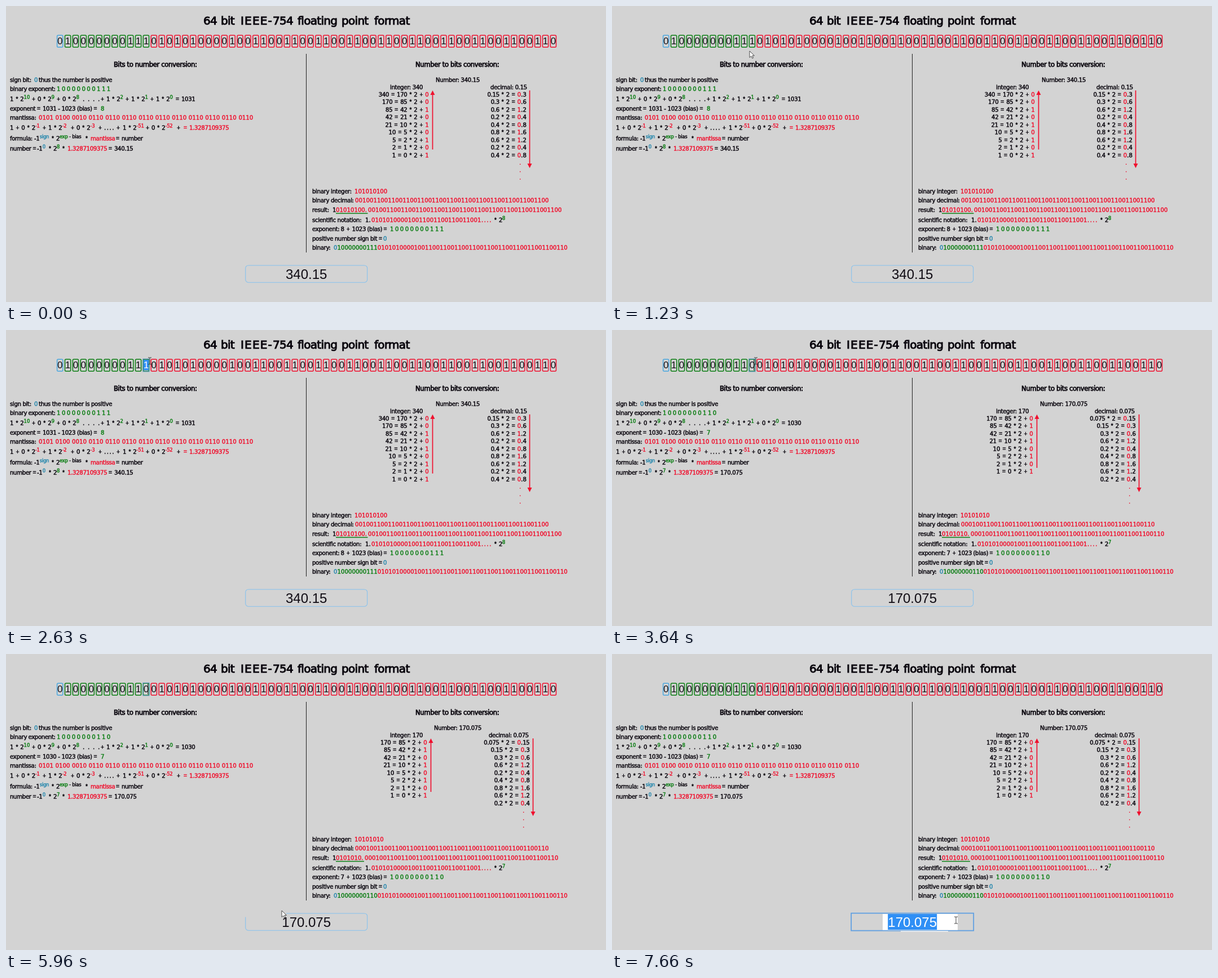
An HTML page for the animation above (8 s loop, 1064 by 526 pixels).

```html
<!DOCTYPE html>
<html lang="en">
<head>
<meta charset="utf-8">
<title>64 bit IEEE-754 floating point format</title>
<style>
html, body { margin: 0; width: 100%; height: 100%; overflow: hidden; background: #d3d3d3; }
svg { display: block; width: 100vw; height: 100vh; }
text { white-space: pre; }
.note { font-family: "DejaVu Sans", sans-serif; }
.note tspan { fill: currentColor; stroke: currentColor; }
.note .op { font-family: "Liberation Sans", Arial, sans-serif; word-spacing: 0.11em; }
.field { font-family: "Liberation Sans", Arial, sans-serif; fill: #100c14; }
</style>
</head>
<body>
<svg id="stage" viewBox="0 0 1064 526"></svg>
<script>
const LOOP = 8000;
const FLIP = 3640, BIT_FOCUS = 2080, FIELD_FOCUS = 7120;
const INK = { k: '#08040c', r: '#f0102e', g: '#0a7d12', b: '#2788ad' };
const EDITED = 11;

function el(parent, tag, attrs = {}, content) {
  const node = document.createElementNS('http://www.w3.org/2000/svg', tag);
  for (const key in attrs) node.setAttribute(key, attrs[key]);
  if (content !== undefined) node.textContent = content;
  parent.appendChild(node);
  return node;
}

// Letter spacing in em by kind of run.
function spacingOf(run) {
  if (/[=+*]/.test(run)) return 0;
  if (/^\.{2,}$/.test(run)) return 0.15;
  if (/^[01.]+$/.test(run)) return 0;
  if (/^[A-Z]+-$/.test(run)) return 0.06;
  return -0.035;
}

// Markup: ~c picks an ink, ^ and _ open and close a superscript, @x; jumps to x.
function note(parent, x, y, src, { size = 10.2, weight = 0.45, anchor = 'start', gap } = {}) {
  const line = el(parent, 'text', {
    class: 'note', x, y, 'font-size': size, 'stroke-width': weight, 'text-anchor': anchor
  });
  if (gap) line.setAttribute('word-spacing', gap);
  let ink = 'k', sup = false, raised = 0, jump = null;
  for (const part of src.match(/~[kgrb]|\^|_|@\d+;| ?[=+*] ?|\d[\d.]*|\.+|[^~^_@\d.=+*]+/g)) {
    if (part[0] === '~') ink = part[1];
    else if (part === '^') sup = true;
    else if (part === '_') sup = false;
    else if (part[0] === '@') jump = parseInt(part.slice(1), 10);
    else {
      const span = el(line, 'tspan', { style: `color:${INK[ink]};letter-spacing:${spacingOf(part)}em` }, part);
      const lift = sup ? -4 : 0;
      if (/[=+*]/.test(part)) span.setAttribute('class', 'op');
      if (sup) span.setAttribute('font-size', 8.5);
      if (lift !== raised) span.setAttribute('dy', lift - raised);
      if (jump !== null) span.setAttribute('x', jump);
      raised = lift;
      jump = null;
    }
  }
}

function arrow(parent, x, from, to) {
  const d = Math.sign(to - from);
  el(parent, 'path', { d: `M${x} ${from}V${to - d * 6}`, stroke: INK.r, 'stroke-width': 1.7 });
  el(parent, 'path', { d: `M${x} ${to}l-4 ${-d * 8}h8z`, fill: INK.r });
}

const mantissa = '010101000010' + '0110'.repeat(10);
const spaced = s => s.split('').join(' ');
const round = v => +v.toFixed(3);

function leftSide(g, value, power, exponent) {
  const e = exponent;
  note(g, 7, 134.5, 'sign bit: @50;~b0@58;~kthus the number is positive');
  note(g, 7, 150.5, `binary exponent: @90;~g${spaced(e)}`, { gap: -0.5 });
  const term = (bit, p) => `${bit} * 2~g^${p}_~k`;
  note(g, 7, 168.5, `${term(e[0], 10)}@46;+ ${term(e[1], 9)}@90;+ ${term(e[2], 8)}@136;.  .  .  .` +
    `@168;+ ${term(e[8], 2)}@212;+ ${term(e[9], 1)}@256;+ ${term(e[10], 0)}@301;= ${power + 1023}`);
  note(g, 7, 185.5, `exponent = ${power + 1023} - 1023 (bias) =@168;~g${power}`);
  note(g, 7, 201.5, `mantissa: @58;~r${mantissa.match(/.{4}/g).join(' ')}`, { gap: 0.7 });
  const frac = (bit, p) => `${bit} * 2~r^-${p}_~k`;
  note(g, 7, 220, `1 + ${frac(0, 1)}@65;+ ${frac(1, 2)}@115;+ ${frac(0, 3)}@164;+ ....` +
    `@196;+ @207;${frac(1, 51)}@248;+ ${frac(0, 52)}@303;+@315;~r=@325;1.3287109375`);
  note(g, 7, 238.5, 'formula: @50;-1~b^sign_~k@81;* 2~g^exp~k@112;- bias_@141;*@150;~rmantissa@195;~k= number');
  note(g, 7, 257, `number =@55;-1~b^0_~k@76;* 2~g^${power}_~k@100;*@109;~r1.3287109375@182;~k= ${value}`);
}

function rightSide(g, value, power, exponent, shift) {
  const whole = Math.floor(value), rest = round(value - whole);
  const bits = whole.toString(2);
  note(g, 801, 134.5, `Number: ${value}`, { anchor: 'middle' });
  note(g, 681, 147.5, `integer: ${whole}`);
  note(g, 891.5, 147.5, `decimal: ${rest}`, { anchor: 'middle' });

  const rowY = i => 161 + i * 13.45;
  for (let n = whole, i = 0; n > 0; n >>= 1, i++)
    note(g, 749.8 - shift / 2, rowY(i), `${n} = ${n >> 1} * 2 + ~r${n % 2}`, { anchor: 'end' });
  for (let f = rest, i = 0; i < 9; i++) {
    const d = round(f * 2);
    note(g, 922.5 + shift, rowY(i), `${f} * 2 = ~r${Math.floor(d)}~k${String(d).slice(1)}`, { anchor: 'end' });
    f = round(d % 1);
  }
  for (let i = 0; i < 3; i++)
    el(g, 'rect', { x: 911 + shift, y: 280.5 + i * 13.2, width: 1.5, height: 1.5, fill: INK.r });
  arrow(g, 756.5 - shift / 2, 255 - (9 - bits.length) * 10, 150);
  arrow(g, 928.6 + shift, 150, 288);

  const zeros = bits.length === 9 ? '00' : '000';
  const tail = (zeros + '1001'.repeat(13)).slice(0, 53);
  const point = 585 + (bits.length - 1) * 6.5 + 4.5;
  note(g, 543, 332.8, `binary integer: @618;~r${bits}`);
  note(g, 543, 349, `binary decimal: @619;~r${tail}`);
  note(g, 543, 366, `result: @579;1@585;~r${bits.slice(1)}.@${Math.round(point + 0.5)};${tail}`);
  el(g, 'path', { d: `M585 368.5H${point}`, stroke: INK.g, 'stroke-width': 1.6 });
  note(g, 543, 384, `scientific notation: @637;1.@648;~r${mantissa.slice(0, 30)}@843;....@866;~k* 2~g^${power}`);
  note(g, 543, 400.4, `exponent: ${power} + 1023 (bias) =@681;~g${spaced(exponent)}`, { gap: -0.5 });
  note(g, 543, 416.8, 'positive number sign bit =@669;~b0');
  note(g, 543, 433, `binary: @581;~b0~g${exponent}~r${mantissa}`);
}

function scene(value, power, shift) {
  const g = el(stage, 'g');
  const exponent = (power + 1023).toString(2).padStart(11, '0');
  leftSide(g, value, power, exponent);
  rightSide(g, value, power, exponent, shift);
  return g;
}

const stage = document.getElementById('stage');
el(stage, 'rect', { width: 1064, height: 526, fill: '#d3d3d3' });
note(stage, 350, 33, '64@381;bit@416;IEEE-754@517;floating@595;point@653;format', { size: 20, weight: 1 });
const head = { size: 11.7, weight: 0.75 };
note(stage, 191, 108.3, 'Bits to number conversion:', head);
note(stage, 726, 108.3, 'Number to bits conversion:', head);
el(stage, 'path', { d: 'M532.5 85V438', stroke: '#222', 'stroke-width': 1 });

const boxX = i => 90.6 + i * 13.885;
const bitText = (parent, i, bit, fill) => el(parent, 'text', {
  class: 'field', x: boxX(i) + 5.1, y: 68.2, 'font-size': 17, 'text-anchor': 'middle', style: fill ? `fill:${fill}` : ''
}, bit);
const digits = [...('0' + '10000000111' + mantissa)].map((bit, i) => {
  const stroke = i === 0 ? '#4aa8e0' : i < 12 ? INK.g : INK.r;
  el(stage, 'rect', { x: boxX(i), y: 51.9, width: 10.2, height: 21.4, rx: 2, fill: 'none', stroke, 'stroke-width': 1.5 });
  return bitText(stage, i, bit);
});
const before = scene(340.15, 8, 0);
const after = scene(170.075, 7, 6);

const live = el(stage, 'g');

// Pointer stops: time, x, y. Each holds until the next.
const stops = [
  [300, 955, 511], [380, 673, 430], [450, 520, 314], [680, 361, 240], [760, 233, 153],
  [990, 236, 132], [1070, 240, 112], [1150, 243, 94], [1230, 244, 80], [1310, 245, 77],
  [1390, 246, 72], [1470, 246, 69], [1550, 247, 66], [1700, 247, 64], [2250, 248, 62],
  [2400, 254, 62], [2550, 255, 58], [2630, 255, 55],
  [4730, 290, 98], [4810, 380, 215], [4890, 440, 310], [4960, 471, 357],
  [5190, 480, 405], [5270, 484, 432], [5350, 486, 444], [5660, 487, 450], [5740, 488, 453], [5810, 489, 456],
  [6580, 489, 459], [6660, 489, 463], [6740, 489, 468], [6820, 490, 472],
  [7200, 540, 473], [7280, 593, 475], [7660, 610, 473]
];
const overInput = (x, y) => (y > 50 && y < 75) || (y > 461 && y < 491 && x > 425 && x < 641);

function pointer(x, y) {
  if (overInput(x, y)) {
    el(live, 'path', {
      d: 'M-3-6H-1Q0-6 0-5V5Q0 6-1 6H-3M3-6H1Q0-6 0-5M0 5Q0 6 1 6H3',
      transform: `translate(${x} ${y})`, fill: 'none', stroke: '#3c3c3c', 'stroke-width': 1
    });
  } else {
    el(live, 'path', {
      d: 'M0 0V11.5L2.8 9L4.8 13L6.6 12.2L4.8 8.2H8.4Z',
      transform: `translate(${x} ${y})`, fill: '#fff', stroke: '#222', 'stroke-width': 0.8
    });
  }
}

function halo(cx, cy) {
  el(live, 'circle', { cx, cy, r: 9, fill: '#f0d850', opacity: 0.65 });
}

function drawBit(t) {
  const focused = t >= BIT_FOCUS && t < FIELD_FOCUS;
  const selected = t >= 2400 && t < FLIP;
  const digit = digits[EDITED];
  digit.textContent = t < FLIP ? '1' : '0';
  digit.style.fill = selected ? 'transparent' : '';
  if (!focused) return;
  const x = boxX(EDITED);
  el(live, 'rect', { x: x - 0.3, y: 51.4, width: 10.8, height: 22.4, fill: 'none', stroke: '#4f93b5', 'stroke-width': 1.2 });
  if (selected) {
    el(live, 'rect', { x: x + 0.6, y: 53, width: 9, height: 18.5, fill: '#2f8ff5' });
    bitText(live, EDITED, '1', '#fff');
  }
  if (t >= FLIP && Math.floor((t - FLIP) / 535) % 2 === 0)
    el(live, 'path', { d: 'M251.7 53V71.5', stroke: '#222', 'stroke-width': 1 });
}

function drawField(t, x) {
  const focused = t >= FIELD_FOCUS;
  el(live, 'rect', focused
    ? { x: 424.2, y: 460.6, width: 217, height: 31, fill: 'none', stroke: '#5f9fe2', 'stroke-width': 1.8 }
    : { x: 424.7, y: 461, width: 216, height: 30.2, rx: 5, fill: 'none', stroke: '#86c2ee', 'stroke-width': 1.1 });
  if (t >= 5740 && !focused)
    el(live, 'rect', { x: 423, y: 459.5, width: 74, height: 8, fill: '#d3d3d3' });

  const value = t < FLIP ? '340.15' : '170.075';
  const dragging = t >= 7200;
  const chosen = dragging ? Math.min(value.length, Math.round((x - 489) / 13)) : 0;
  if (dragging) {
    el(live, 'rect', { x: 480, y: 462, width: x + 3 - 480, height: 28.5, fill: '#fff' });
    el(live, 'rect', { x: 512, y: 492, width: Math.min(x + 3, 596) - 512, height: 1.6, fill: '#f4f4f4' });
    el(live, 'rect', { x: 489.2, y: 462, width: Math.min(87, chosen * 13.35), height: 28, fill: '#2f8ff5' });
  }
  const label = el(live, 'text', { class: 'field', x: 532.7, y: 484.8, 'font-size': 24, 'text-anchor': 'middle' });
  el(label, 'tspan', { fill: '#fff' }, value.slice(0, chosen));
  el(label, 'tspan', {}, value.slice(chosen));
  if (focused && !dragging)
    el(live, 'path', { d: 'M488.8 462.5V490', stroke: '#222', 'stroke-width': 1 });
}

function render(t) {
  before.style.display = t < FLIP ? '' : 'none';
  after.style.display = t < FLIP ? 'none' : '';
  live.replaceChildren();
  const stop = stops.filter(s => s[0] <= t).pop();
  const [, x, y] = stop || [0, 1100, 560];
  if (t >= BIT_FOCUS && t < 2250) halo(246, 62.5);
  if (t >= FIELD_FOCUS && t < 7200) halo(488.5, 471.5);
  drawBit(t);
  drawField(t, x);
  if (stop) pointer(x, y);
}

const start = performance.now();
function tick() {
  render((performance.now() - start) % LOOP);
  requestAnimationFrame(tick);
}
tick();
</script>
</body>
</html>
```
